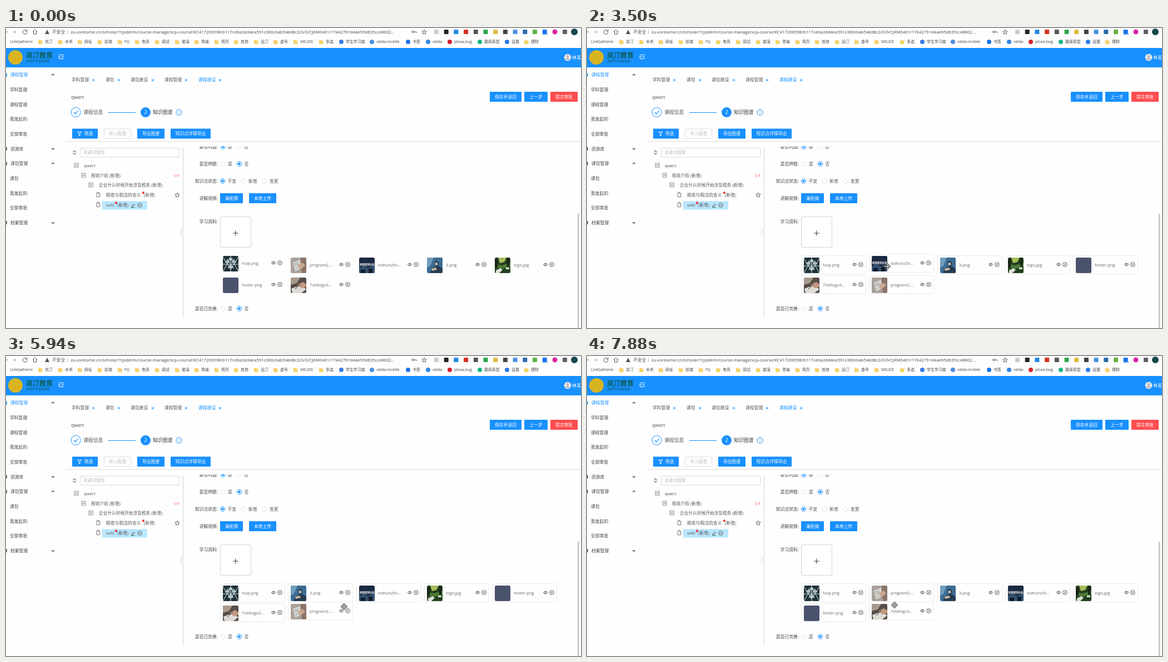
These frames come from a looping animation (1034 px wide and 541 px high, 8 s). An HTML page:

```html
<!DOCTYPE html>
<html lang="zh-CN">
<head>
<meta charset="utf-8">
<title>课程建设</title>
<style>
html, body { margin: 0; width: 100%; height: 100%; overflow: hidden; background: #fefefe; }
svg { display: block; }
text { font-family: "Open Sans", "Noto Sans CJK SC", "Noto Sans CJK", sans-serif; white-space: pre; }
.frame { fill: #fefefe; stroke: #ececec; x: .5px; y: .5px; width: 116px; height: 33px; }
.bare .frame { stroke: none; fill: none; }
.drag .frame { x: -5px; width: 122px; y: 0; height: 35px; stroke: #f4f4f4; filter: drop-shadow(0 2px 1.5px rgba(0,0,0,.2)); }
.ghost { opacity: .8; }
</style>
</head>
<body>
<svg width="1034" height="541" viewBox="0 0 1034 541">
  <defs>
    <clipPath id="round"><rect width="28" height="28" rx="2.5"/></clipPath>
    <clipPath id="below"><rect x="320" y="213.5" width="200" height="20"/></clipPath>
    <g id="eye" fill="none" stroke="#555" stroke-width=".9"><path d="M-4 0Q0-5 4 0Q0 5-4 0Z"/><circle r="1.2"/></g>
    <g id="remove" fill="none" stroke="#444" stroke-width=".9"><circle r="3.8"/><path d="M-1.5-1.5l3 3m0-3l-3 3"/></g>
    <g id="thumb-h" clip-path="url(#round)">
      <path fill="#20313a" d="M0 0h28v28H0z"/>
      <path fill="#9fb6b8" d="M10 4h8l-4 6zM3 12l6-7 4 8zM25 12l-6-7-4 8zM8 22l6-8 6 8z"/>
      <path fill="none" stroke="#dbe6e6" d="M0 15h28M14 0v28M0 28L14 3l14 25M0 2l14 22L28 2"/>
    </g>
    <g id="thumb-p" clip-path="url(#round)">
      <path fill="#aaa19b" d="M0 0h28v28H0z"/><path fill="#d8d6d2" d="M4 9l13-5 5 14-14 7z"/>
      <path fill="#8b7468" d="M18 0h10v28h-7l-4-10z"/><path fill="#c9a894" d="M12 14l9-5 5 5-9 8z"/>
      <path fill="none" stroke="#87969d" d="M6 12l8-3M7 15l7-3M9 20l4-2"/>
    </g>
    <g id="thumb-i" clip-path="url(#round)">
      <path fill="#1b2a42" d="M0 0h28v28H0z"/><path fill="#33506f" d="M0 18l9-4 7 5 12-6v15H0z"/>
      <path fill="#111b2c" d="M3 22h8v6H3zM17 20h7v8h-7z"/>
      <text x="1" y="14" font-size="4.4" font-weight="700" fill="#fff">财税规划分析</text>
    </g>
    <g id="thumb-3" clip-path="url(#round)">
      <path fill="#3c6c94" d="M0 0h28v28H0z"/><path fill="#6f9dbb" d="M0 0h12L6 15 0 18z"/>
      <path fill="#263c50" d="M14 7q5-3 7 3l-1 5 8 5v8H5l4-9 6-3z"/><path fill="#c4b6aa" d="M15 9h4v5h-4zM8 20l8-2 2 4-9 2z"/>
    </g>
    <g id="thumb-l" clip-path="url(#round)">
      <path fill="#234020" d="M0 0h28v28H0z"/><path fill="#a9bd5c" d="M6 0h15l-4 8-8 2z"/>
      <path fill="#4b7a35" d="M0 12l12 2 16-4v6l-14 4-14-2z"/><path fill="#172516" d="M0 3h5v15H0zM22 0h4v16h-4z"/>
      <path fill="#dde2d4" d="M2 23l8-4 4 3-6 6H2zM20 18h6v3h-6z"/>
    </g>
    <g id="thumb-f" clip-path="url(#round)"><path fill="#4b526c" d="M0 0h28v28H0z"/></g>
    <g id="thumb-7" clip-path="url(#round)">
      <path fill="#574d49" d="M0 0h28v28H0z"/><path fill="#a8998c" d="M0 0h17l-6 10-11 3z"/>
      <path fill="#dedbd6" d="M1 20l16-6 11 7-9 7H3z"/><path fill="#c19880" d="M12 13l10-5 6 4v5l-9 2z"/>
      <path stroke="#222" d="M8 21l9-9"/>
    </g>
    <path id="mover" fill="#fff" stroke="#222" stroke-width=".9" d="M0-6l2.4 2.6H.9v2.5h2.5v-1.5L6 0 3.4 2.4V.9H.9v2.5h1.5L0 6l-2.4-2.6h1.5V.9h-2.5v1.5L-6 0l2.6-2.4v1.5h2.5v-2.5h-1.5z"/>
    <path id="arrow" fill="#fff" stroke="#222" stroke-width=".9" d="M0 0v9.5l2.3-2 1.5 3.3 1.5-.7-1.5-3.2h3z"/>
  </defs>
  <g id="page"></g>
  <g id="cards"></g>
  <g id="overlay"></g>
</svg>
<script>
const BLUE = '#1890ff', INK = '#555', $ = id => document.getElementById(id);

const text = (x, cy, str, size = 7.8, fill = INK, attrs = '') =>
  `<text x="${x}" y="${cy + size * .36}" font-size="${size}" fill="${fill}" ${attrs}>${str}</text>`;
const box = (x, y, w, h, fill, attrs = '') =>
  `<rect x="${x}" y="${y}" width="${w}" height="${h}" fill="${fill}" ${attrs}/>`;
const dot = (x, y, r, fill, attrs = '') => `<circle cx="${x}" cy="${y}" r="${r}" fill="${fill}" ${attrs}/>`;
const line = (d, stroke = INK, width = 1) =>
  `<path d="${d}" fill="none" stroke="${stroke}" stroke-width="${width}"/>`;
const use = (id, x, y) => `<use href="#${id}" x="${x}" y="${y}"/>`;
const middle = 'text-anchor="middle"';
const button = (x, y, w, label, fill = BLUE, shift = 0) =>
  box(x, y, w, 18, fill, 'rx="1"') + text(x + w / 2 + shift, y + 9, label, 7.8, '#fff', middle);
const radio = (x, y, on) => dot(x, y, 4.2, '#fff', `stroke="${on ? BLUE : '#e2e2e2'}"`) + (on ? dot(x, y, 2.3, BLUE) : '');
const choices = (y, label, items) => text(381, y, label + ':', 7.8, '#444', 'text-anchor="end"') +
  items.map(([x, name, on]) => radio(x, y, on) + text(x + 9, y, name)).join('');

function browserBar() {
  const marks = [[61, '岚汀'], [97, '木禾'], [132, '网址'], [168, '前端'], [204, 'FQ'], [235, '电商'], [271, '调试'],
    [307, '棠溪'], [342, '青岫'], [378, '简历'], [413, '其他'], [449, '远汀'], [484, '虚号'], [520, 'MD,IDE'], [566, '多选'],
    [602, '学生学习端', '#3b7de0'], [657, 'velda-mobile', '#4a90e2'], [722, '书签', '#1a73e8'], [758, 'velda', '#2f86e8'],
    [797, 'ploxa-bug', '#d5202c'], [851, '题库原型', '#13b583'], [900, '设置', '#2a7de1'], [935, '理财']];
  const extensions = ['#ccc', '#222', '#1e88e5', '#d93025', '#555', '#2fa84f', '#e0b93c', '#444', '#4a90e2', '#2b6cb0', '#63b246', '#1a73e8'];
  return line('M12 7h6m-3-3l3 3-3 3', '#aaa') + line('M0 7h3', '#666') +
    line('M37 5a3.8 3.8 0 1 0 .8 3M38 3v3h-3') + line('M48 7l4-4 4 4M49.5 6v5h5V6') +
    '<path fill="#555" d="M74 3l4 8h-8z"/>' + text(83, 7, '不安全') + line('M110.5 3v8', '#bbb') +
    text(116, 7, 'zu.vorelume.cn/scholar/?cjsd#/m/course-manage/scp-course/KC417206598/b117ce6a2dd4ea591c300c6ab54ed8c2/0/0/CJKM0461/17e42791d4ae95d835cc48602...', 7.7, '#444') +
    dot(731.5, 7, 1.7, 'none', 'stroke="#555"') + line('M733 7h5v2') +
    line('M752 3l1.2 3 3 .1-2.4 2 .9 3-2.7-1.8-2.7 1.8.9-3-2.4-2 3-.1z', INK, .9) +
    extensions.map((c, i) => box(770 + i * 17.7, 3, 8, 8, c, 'rx="1"')).join('') +
    text(969.5, 11, 'ON', 6, '#1a73e8', middle) +
    dot(987, 7, 4.5, '#d6249f') + box(1001, 3, 8, 8, '#5f6368', 'rx="1"') + dot(1022, 7, 6, '#17474e') +
    text(7, 25, 'LinkGatherer', 6.8, '#444') +
    marks.map(([x, name, c]) => (c ? dot(x + 1, 25, 4, c) :
      `<path fill="#f6d26b" d="M${x - 3} 21.5h3l1 1h3.5v6.5h-7.5z"/>`) + text(x + 9, 25, name, 6.9, '#444')).join('');
}

function shell() {
  const menu = ['课程管理', '学科管理', '课程管理', '我发起的', '全部审批', '资源库', '课包管理', '课包', '我发起的', '全部审批', '档案管理'];
  const turns = { 0: -1, 5: 1, 6: -1, 10: 1 };
  const tabs = [[118, '学科管理', 157], [179, '课包', 203], [224, '课包建设', 264], [285, '课程管理', 324], [346, '课程建设', 385]];
  return box(0, 36, 1034, 35, BLUE) + dot(17, 53, 13, '#d9b421') +
    text(36, 50, '岚汀教育', 12, '#0d5c50', 'font-weight="700"') + text(37, 59, '财税学习·品质课堂', 5, '#0d5c50') +
    line('M95 48.5h9M99 52h5M95 55.5h9M95 50.5v3l2-1.5z', '#fff') +
    dot(1010, 53, 6.3, '#e6e6e6') + dot(1010, 51, 2, '#aaa') + '<path fill="#aaa" d="M1006 57q4-6 8 0z"/>' +
    text(1018, 53, '林某人', 8, '#fff') +
    menu.map((name, i) => {
      const y = 84.5 + i * 26.65, d = turns[i], tint = i ? '#444' : BLUE;
      return text(d ? 8 : 7, y, name, 7.8, tint) +
        (d ? box(0, y - 3, 1.6, 6, tint) + line(`M82 ${y - d}l2.3 ${2.3 * d} 2.3 ${-2.3 * d}`, '#444', 1.2) : '');
    }).join('') +
    tabs.map(([x, name, cx], i) => text(x, 93, name, 7.8, i == 4 ? BLUE : INK) +
      line(`M${cx - 2} 92l4 4m0-4l-4 4`, BLUE)).join('') +
    text(117, 125, 'qwert', 8.6) +
    button(870, 115, 57, '保存并返回') + button(932, 115, 42, '上一步') + button(979, 115, 49, '提交审批', '#ff4d4f') +
    dot(125.5, 152, 8.5, '#fff', `stroke="${BLUE}"`) + line('M122 152l2.6 3 4.6-5.5', BLUE, 1.2) +
    text(139, 152, '课程信息', 8.9) + line('M184 152.5h49', BLUE) +
    dot(251, 152, 9, BLUE) + text(251, 152, '2', 9, '#fff', middle) + text(264, 152, '知识图谱', 8.9, '#333') +
    dot(311, 152, 5.2, 'none', `stroke="${BLUE}"`) + text(311, 152, '?', 8, BLUE, middle) +
    button(119, 181.5, 46, '筛选', BLUE, 6.5) + line('M129 187.5h6.5l-2.3 3v3.5h-1.8v-3.5z', '#fff') +
    box(176.5, 182, 48, 17, '#fff', 'stroke="#d9d9d9" rx="1"') + text(200.5, 190.5, '导入图谱', 7.8, '#bbb', middle) +
    button(236, 181.5, 49, '导出图谱') + button(296, 181.5, 72, '知识点详情导出') +
    line('M108 204.5h926', '#dcdcdc');
}

function tree() {
  const fold = (x, y) => box(x - 3.5, y - 3.5, 7, 7, '#fff', 'stroke="#777" stroke-width=".9"') + line(`M${x - 2} ${y}h4`);
  const sheet = (x, y) => line(`M${x - 2.7} ${y - 4}h3.4l2 2v6h-5.4zM${x + .5} ${y - 4}v2.2h2.2`, '#666', .9);
  return line('M120 223h2.5v-2.5M126.500 223h-2.5v-2.5M120 226h2.5v2.5M126.500 226h-2.500v2.5', '#777') +
    box(133.5, 216.500, 178, 16.5, '#fff', 'stroke="#d9d9d9" rx="1"') + text(139, 224.5, '关键词搜索', 7.8, '#bbb') +
    line('M318.5 216v305', '#d4d4d4') + box(314.5, 363.5, 4, 11, '#fff', 'stroke="#d4d4d4"') +
    fold(126.5, 247.5) + text(140, 248, 'qwert', 7.6) +
    fold(139.5, 265.500) + text(153, 266, '税收介绍 (新增)', 7.7) + text(301, 266, '1/1', 7.6, '#f5383b') +
    fold(152.5, 283) + text(167, 283.5, '企业什么时候开始涉及税务 (新增)', 7.7) +
    sheet(166, 300.5) + text(180, 301, '税收与税法的含义') + dot(247, 297, 1.9, '#f5121d') + text(248, 301, '(新增)', 7.7) +
    line('M308 297l1.2 2.800 3 .1-2.4 2 .9 3-2.7-1.700-2.700 1.700.9-3-2.4-2 3-.1z', INK, .9) +
    sheet(166, 318.5) + box(173, 312, 81, 15.5, '#bae7ff') + text(180, 319.5, 'ssfd', 7.6) +
    dot(198, 315.500, 1.9, '#f5121d') + text(200, 319.5, '(新增)', 7.7) +
    line('M226 321l4-4 1.500 1.500-4 4h-1.500zM225 323.500h7', INK, .9) +
    dot(240.5, 319.500, 3.700, 'none', `stroke="${INK}" stroke-width=".9"`) + line('M238.500 319.500h4');
}

function form() {
  return `<g clip-path="url(#below)">${choices(214, '是否巩固', [[390, '是', 1], [419, '否']])}</g>` +
    choices(245, '是否押题', [[390, '是'], [419.5, '否', 1]]) +
    choices(276, '知识点状态', [[389.5, '不变', 1], [427, '新增'], [465, '变更']]) +
    choices(307, '讲解视频', []) + button(385, 298, 41, '澜拓微') + button(437, 298, 49, '本地上传') +
    choices(349, '学习资料', []) + box(385.5, 340.5, 55, 55, '#fff', 'stroke="#d4d4d4" rx="1"') +
    line('M408 370h9.500M412.750 365.250v9.500', '#333') +
    choices(506, '是否已完善', [[390, '是'], [419.5, '否', 1]]) + box(1028, 335, 2.5, 206, '#c4c4c4');
}

// Each file: full name, shortened name
const files = {
  h: ['huiji.png'], p: ['program2.png', 'program2.…'], i: ['isdhunz5v61c1w4i.png', 'isdhunz5v…'], 3: ['3.png'],
  l: ['logo.jpg'], f: ['footer.png'], 7: ['7vb6ogu3k2.png', '7vb6ogu3…']
};
const keys = Object.keys(files);
const card = k => `<g id="card-${k}"><rect class="frame" rx="2"/>${use('thumb-' + k, 5, 4)}` +
  text(39, 17.5, files[k][1] || files[k][0], 7.4, '#666') + use('eye', 96, 16.5) + use('remove', 107.5, 16.5) + '</g>';
const ghost = k => `<g id="ghost-${k}" class="ghost">${use('thumb-' + k, 0, 0)}` +
  text(30, 13.5, files[k][0], 7.4, '#666') + use('eye', 96, 16) + use('remove', 107.5, 16) + '</g>';
const tip = (k, x, w) => `<g id="tip-${k}">${box(x - w / 2, 387.5, w, 19.500, '#434343', 'rx="1.5"')}
  <path fill="#434343" d="M${x - 3} 406.500h6l-3 3z"/>${text(x, 397, files[k][0], 7.4, '#fff', middle)}</g>`;

$('page').innerHTML = browserBar() + shell() + tree() + form();
$('cards').innerHTML = keys.map(card).join('');
$('overlay').innerHTML = ghost('p') + ghost('i') + tip('h', 404.5, 40) + tip('p', 527, 58) +
  `<g id="cursor">${['mover', 'arrow'].map(id => `<use id="as-${id}" href="#${id}"/>`).join('')}</g>`;

// Bursts of movement: start, end, number of steps
const bursts = [[150, 640, 4], [1320, 2260, 8], [2380, 3360, 8], [3500, 4440, 8], [4570, 4870, 3],
  [5300, 5540, 3], [5820, 6760, 8], [6910, 7330, 4], [7600, 7880, 3]];
const orders = [[-999, 'hpi3lf7'], [2060, 'hi3lf7p'], [3690, 'ih3lf7p'], [4130, 'hi3lf7p'], [4500, 'h3ilf7p'],
  [6380, 'h3ilfp7'], [6880, 'hp3ilf7']];
const hovers = [[0, 'h'], [1450, 'p'], [3100, 'i'], [5950, 'p'], [7700, '7']];
const drags = [[0, ''], [1950, 'p'], [2900, ''], [3600, 'i'], [5300, ''], [6200, 'p'], [7600, '']];
const pushes = [[0, 0], [3900, 0], [4320, 3], [5299, 3], [5300, 0], [6300, 0], [6500, 3], [7599, 3], [7600, 0]];
const tips = {
  h: [[150, 0], [480, 1], [1320, 1], [1500, 0]],
  p: [[1500, 0], [1700, 1], [1800, 1], [1950, 0]]
};
const cursorPath = [[150, 440, 437], [310, 425, 430], [640, 415, 428], [1320, 440, 427], [1588, 525, 425], [1722, 533, 426],
  [1990, 545, 430], [2260, 565, 445], [2660, 574, 445], [2940, 575, 446], [3360, 545, 430], [3500, 540, 430],
  [3770, 500, 440], [4037, 487, 439], [4305, 560, 438], [4570, 640, 433], [4870, 688, 432], [5540, 688, 430],
  [5820, 670, 440], [6090, 545, 464], [6760, 460, 473], [6910, 490, 455], [7050, 533, 432], [7330, 540, 430], [7880, 553, 449]];
const ghostPath = [[1950, 513, 412], [2126, 510, 425], [2260, 507, 444], [2900, 507, 444], [3600, 513, 411], [3770, 450, 415],
  [4037, 424, 417], [4305, 500, 413], [4870, 626, 408], [5300, 626, 408], [6200, 513, 448], [6360, 445, 444],
  [6760, 405, 441], [6910, 440, 425], [7050, 480, 405], [7330, 490, 395]];
const bordersFrom = [150, 1320, 2126, 2126, 2126, 2380, 2380];

const lastIndex = (list, t) => Math.max(0, list.findLastIndex(e => e[0] <= t));
function along(path, t) {
  const i = lastIndex(path, t), a = path[i], b = path[i + 1] || a;
  const p = Math.min(1, Math.max(0, (t - a[0]) / (b[0] - a[0] || 1)));
  return a.slice(1).map((v, n) => v + (b[n + 1] - v) * p);
}
function snap(t) {
  const i = bursts.findLastIndex(b => b[0] <= t);
  if (i < 0) return 0;
  const [start, end, n] = bursts[i], gap = (end - start) / (n - 1);
  return start + gap * Math.min(n - 1, Math.floor((t - start) / gap + .25));
}
const slotX = s => 385 + 122.25 * (s % 5), slotY = s => s < 5 ? 410 : 446;
const move = (el, x, y) => el.setAttribute('transform', `translate(${Math.round(x)} ${Math.round(y)})`);
const show = (el, on) => el.style.display = on ? '' : 'none';

function draw(now) {
  const t = snap(now % 8000), n = lastIndex(orders, t);
  const order = orders[n][1], before = orders[Math.max(0, n - 1)][1];
  const p = Math.min(1, (t - orders[n][0]) / 300);
  const drag = drags[lastIndex(drags, t)][1], hover = hovers[lastIndex(hovers, t)][1];
  const push = along(pushes, t)[0], held = order.indexOf(drag || hover);

  for (const k of keys) {
    const el = $('card-' + k), from = before.indexOf(k), to = order.indexOf(k);
    const pushed = to > held && (to < 5) === (held < 5) ? push : 0;
    const mix = f => f(from) + (f(to) - f(from)) * p;
    move(el, mix(slotX) + pushed, mix(slotY) - (k === hover ? 3 : 0));
    el.setAttribute('class', k === drag ? 'drag' : t < bordersFrom[to] ? 'bare' : '');
  }
  const top = $('card-' + (drag || hover));
  if ($('cards').lastElementChild !== top) $('cards').append(top);

  const [gx, gy] = along(ghostPath, t);
  for (const k of ['p', 'i']) { show($('ghost-' + k), k === drag); move($('ghost-' + k), gx, gy); }
  for (const k in tips) $('tip-' + k).style.opacity = along(tips[k], t)[0];

  const [cx, cy] = along(cursorPath, t), pointing = t > 3700 && t < 4250;
  move($('cursor'), cx, cy);
  show($('cursor'), t >= 150);
  show($('as-arrow'), pointing);
  show($('as-mover'), !pointing);
}

const begin = performance.now();
function tick() {
  draw(performance.now() - begin);
  requestAnimationFrame(tick);
}
tick();
</script>
</body>
</html>
```
